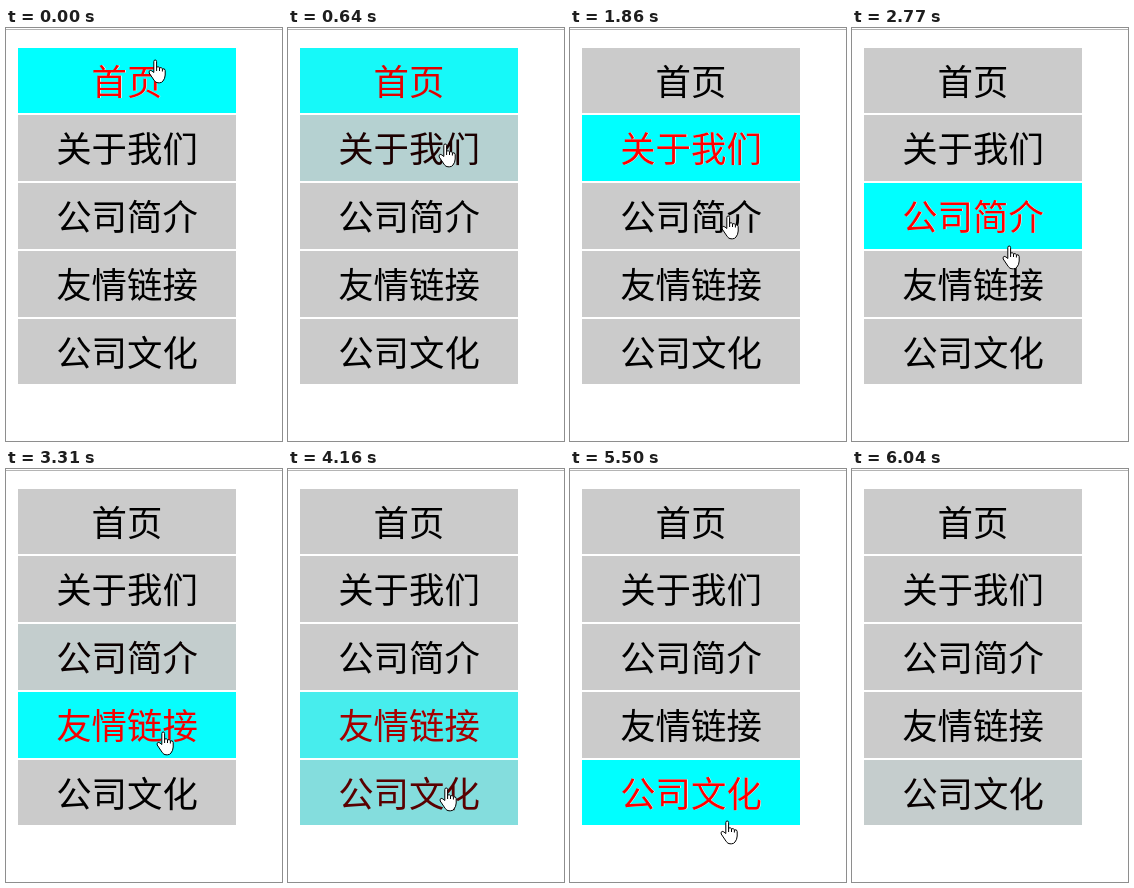
These frames come from a looping animation (276x413 px, 6430 ms). An HTML page with a canvas:

```html
<!DOCTYPE html>
<html lang="zh-CN">
<head>
<meta charset="utf-8">
<style>
html, body { margin: 0; width: 100%; height: 100%; overflow: hidden; background: #fff; }
canvas { display: block; }
</style>
</head>
<body>
<canvas id="stage" width="276" height="413"></canvas>
<script>
const ctx = document.getElementById('stage').getContext('2d', { alpha: false });
const LOOP = 6430;
const FADE = 500;
const REFRESH = 131;
const LEAD = 33;
const PITCH = 67.75;
const GRAY = 203;

const labels = ['首页', '关于我们', '公司简介', '友情链接', '公司文化'];
// Item i is hovered from hoverTimes[i] until hoverTimes[i + 1]
const hoverTimes = [-FADE, 600, 1850, 2900, 4080, 5636];

const pointerStart = { x: 142, y: 31 };
const moves = [
  { at: 300, span: 480, x: 153, y: 145 },
  { at: 1600, span: 360, x: 150, y: 210 },
  { at: 2640, span: 110, x: 150, y: 217 },
  { at: 2760, span: 515, x: 150, y: 262 },
  { at: 3770, span: 420, x: 151, y: 318 },
  { at: 5380, span: 120, x: 150, y: 351 },
  { at: 5503, span: 260, x: 150, y: 425 }
];

const hand = new Path2D(
  'M5.8 13.5V2.6Q5.8 1 7.2 1Q8.6 1 8.6 2.6V8Q10.6 7.2 11.5 8.8Q13.4 8 14.4 9.8' +
  'Q17 9.2 17.2 11.6V16Q17 19.5 15 22Q13.8 23.8 11.5 23.8H10Q7.8 23.8 6.3 21.6' +
  'L1.2 14Q.6 11.8 2.2 11.4Q3.7 11.3 5.8 13.5Z');
const knuckles = new Path2D('M8.6 8V12M11.5 8.8V12M14.4 9.8V12.5');

const clamp = v => Math.min(1, Math.max(0, v));

// CSS "ease": cubic-bezier(.25, .1, .25, 1)
function ease(x) {
  if (x <= 0) return 0;
  if (x >= 1) return 1;
  const curve = (a, b, u) => 3 * a * u * (1 - u) ** 2 + 3 * b * u * u * (1 - u) + u ** 3;
  let lo = 0, hi = 1;
  for (let i = 0; i < 24; i++) {
    const mid = (lo + hi) / 2;
    if (curve(.25, .25, mid) < x) lo = mid; else hi = mid;
  }
  return curve(.1, 1, lo);
}

function pointerAt(time) {
  return moves.reduce((from, to) => {
    const p = clamp((time - to.at) / to.span);
    return { x: from.x + (to.x - from.x) * p, y: from.y + (to.y - from.y) * p };
  }, pointerStart);
}

const topOf = i => Math.floor(20 + PITCH * i);

function drawItem(label, i, time) {
  const fadeFrom = start => ease((time - start) / FADE);
  const glow = fadeFrom(hoverTimes[i]) - fadeFrom(hoverTimes[i + 1]);
  const mix = (from, to) => Math.round(from + (to - from) * glow);
  const top = topOf(i);
  ctx.fillStyle = `rgb(${mix(GRAY, 0)}, ${mix(GRAY, 255)}, ${mix(GRAY, 255)})`;
  ctx.fillRect(12, top, 218, topOf(i + 1) - 2 - top);

  if (glow === 1) {
    // light right-hand fringe of subpixel text
    ctx.fillStyle = '#fff';
    ctx.fillText(label, 121.6, top + 47);
  }
  ctx.fillStyle = `rgb(${mix(0, 255)}, 0, 0)`;
  ctx.fillText(label, 121, top + 47);
}

function drawPointer({ x, y }) {
  ctx.save();
  ctx.translate(Math.round(x), Math.round(y));
  ctx.fillStyle = '#fff';
  ctx.fill(hand);
  ctx.strokeStyle = '#000';
  ctx.lineWidth = 1;
  ctx.lineJoin = 'round';
  ctx.stroke(hand);
  ctx.stroke(knuckles);
  ctx.restore();
}

function draw(now) {
  // The screen only updates at a low, steady refresh rate
  const time = Math.floor((now % LOOP + LEAD) / REFRESH) * REFRESH;
  ctx.fillStyle = '#fff';
  ctx.fillRect(0, 0, 276, 413);
  ctx.fillStyle = '#b4b4b4';
  ctx.fillRect(0, 1, 276, 1);
  ctx.font = '350 35.4px "Noto Sans CJK SC", "Noto Sans CJK", sans-serif';
  ctx.textAlign = 'center';
  labels.forEach((label, i) => drawItem(label, i, time));
  drawPointer(pointerAt(time));
}

const start = performance.now();
function tick() {
  draw(performance.now() - start);
  requestAnimationFrame(tick);
}
tick();
</script>
</body>
</html>
```
